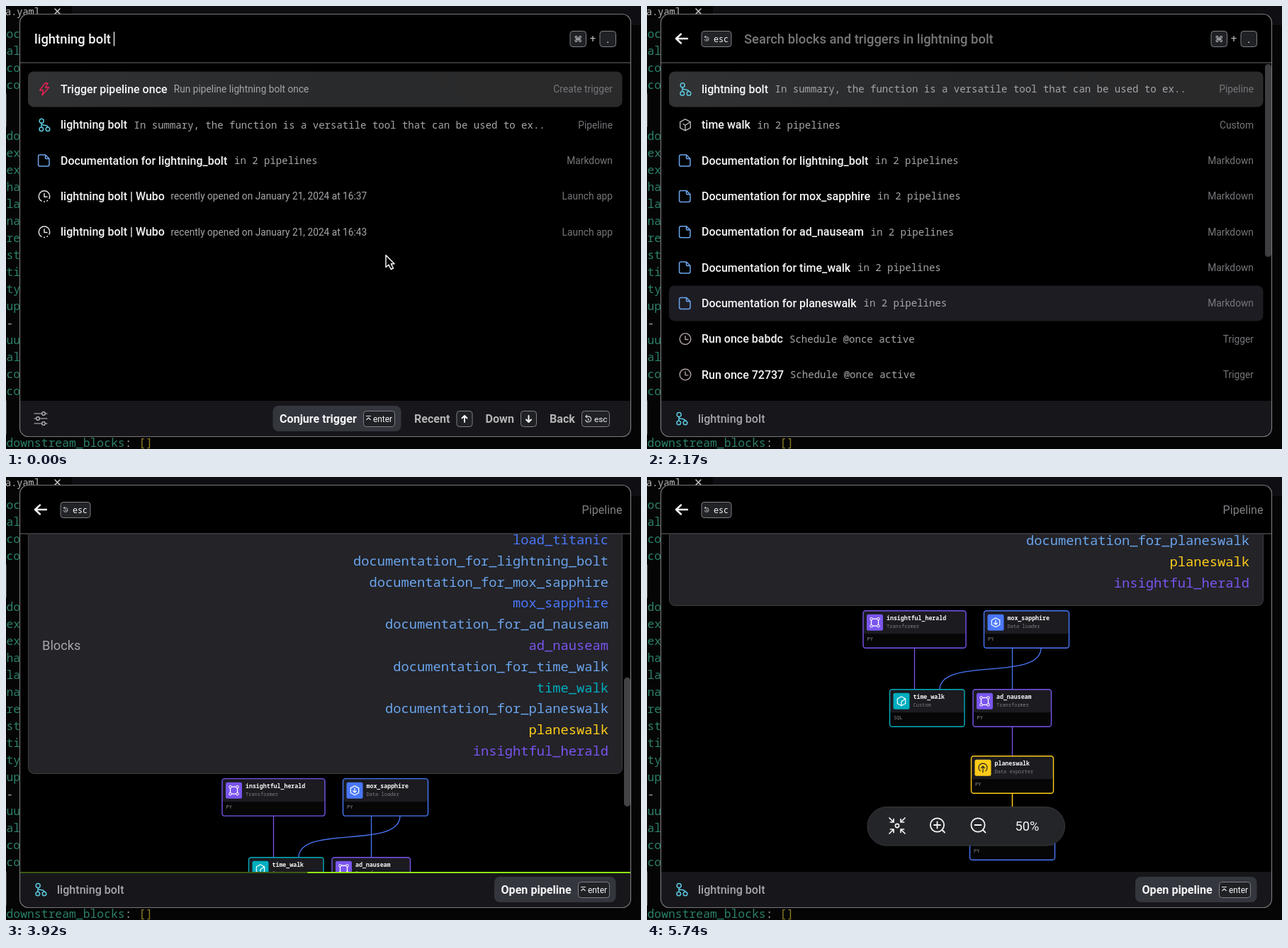
An HTML page for the animation above (6.09 s loop, 896 px wide and 625 px high).

```html
<!DOCTYPE html>
<html lang="en">
<head>
<meta charset="utf-8">
<title>Command palette</title>
<style>
html, body { margin: 0; width: 100%; height: 100%; overflow: hidden; background: #050506; }
svg { display: block; width: 100%; height: 100%; }
text { font-family: Roboto, sans-serif; white-space: pre; }
.mono { font-family: "Noto Sans Mono", "DejaVu Sans Mono", monospace; }
.med { font-weight: 500; }
.bold { font-weight: 700; }
.end { text-anchor: end; }
.mid { text-anchor: middle; }
</style>
</head>
<body>
<svg id="stage" viewBox="0 0 896 625"></svg>
<script>
const LOOP = 6090;
const GREY = '#a6a6aa', DIM = '#76767b', WHITE = '#f5f5f6';
const CYAN = '#5cc6de', BLUE = '#6ba4ec', VIOLET = '#7a55ee', ROYAL = '#4a77f8', TEAL = '#00aebf', GOLD = '#ffcc19';

// Text is placed by its vertical centre.
const text = (x, cy, str, size, fill, cls = '') =>
  `<text x="${x}" y="${cy + size * 0.355}" font-size="${size}" fill="${fill}" class="${cls}">${str}</text>`;
const rect = (x, y, w, h, r, fill, stroke = 'none', sw = 1) =>
  `<rect x="${x}" y="${y}" width="${w}" height="${h}" rx="${r}" fill="${fill}" stroke="${stroke}" stroke-width="${sw}"/>`;
const path = (d, stroke, sw = 1.5, fill = 'none') =>
  `<path d="${d}" fill="${fill}" stroke="${stroke}" stroke-width="${sw}" stroke-linecap="round" stroke-linejoin="round"/>`;
const circle = (x, y, r, stroke, sw = 1.5, extra = '') =>
  `<circle cx="${x}" cy="${y}" r="${r}" fill="none" stroke="${stroke}" stroke-width="${sw}" ${extra}/>`;
const at = (x, y, body, id = '') => `<g ${id && `id="${id}"`} transform="translate(${x} ${y})">${body}</g>`;
const group = (id, body) => `<g id="${id}">${body}</g>`;

const icons = {
  bolt: path('M1 -8.5 L-6.5 1.5 H-1.5 L-3 8.5 L6.5 -2.5 H1.5 L5 -8.5 Z', '#dc2452', 1.6),
  flow: circle(-3.8, -5.6, 3, CYAN) + circle(-4.2, 6, 2.8, CYAN) + circle(5, 6, 2.8, CYAN) +
    path('M-4 -2.5 V3 M-4 -1.5 C-3 2 4 -1 5 3', CYAN),
  doc: path('M-6.2 -8 H1.5 L7 -2.6 V5.8 Q7 8 4.8 8 H-6.2 Q-8.4 8 -8.4 5.8 V-5.8 Q-8.4 -8 -6.2 -8 Z M1.5 -7.8 V-4.4 Q1.5 -2.6 3.5 -2.6 H6.8', BLUE),
  recent: circle(0, 0, 7.7, '#e4e4e6', 1.5, 'stroke-dasharray="4 2.5 2 2.5 2 2.5 33"') +
    path('M0 -4 V0.8 H4', '#e4e4e6'),
  cube: path('M0 -8.2 L7.3 -4.2 V4.2 L0 8.2 L-7.3 4.2 V-4.2 Z M0 8 V0.5 L7 -4 M0 0.5 L-3 -1.3', '#b4b4b7', 1.4),
  clock: circle(0, 0, 7.8, '#b5a3a4', 1.4) + path('M0 -4 V0.8 H4', '#b5a3a4', 1.4),
  loop: path('M-3.6 1 A3.9 3.9 0 1 0 0 -3.9 H-3.6 M-1.8 -5.6 L-3.7 -3.9 L-1.8 -2.1 M0 -1 V1 H1.4', '#dcdcde', 1.1)
};
const icon = (name, x, y) => at(x, y, icons[name]);

const keycap = (x, y, w, body, fill = '#202125') => at(x, y, rect(0.5, 0.5, w - 1, 22, 4, fill, '#7f8084') + body);
const enterKey = x => keycap(x, 571, 45,
  path('M4.5 7.5 H10.5 M4.8 12.5 L7.5 10 L10.2 12.5', '#e5e5e7', 1.2) + text(14, 12, 'enter', 11.9, WHITE));
const arrowKey = (x, dir) => keycap(x, 571, 23,
  path(`M11.5 ${11.5 - 4.5 * dir} V${11.5 + 4 * dir} M8 ${11.5 + dir} L11.5 ${11.5 + 4.5 * dir} L15 ${11.5 + dir}`, WHITE, 2));
const action = (x, w, label) => rect(x, 564, w, 36, 8, '#34363e') +
  text(x + 9.5, 582, label, 16.1, WHITE, 'bold') + enterKey(x + w - 53.5);
const hint = (x, label) => text(x, 582, label, 16.1, '#b3b3b6', 'bold');

const rowY = i => 117.4 + 50.33 * i;
const rowBox = (i, fill, id = '') =>
  at(0, rowY(i) - 25, rect(31, 0, 838.5, 50, 8, fill), id);
const row = ([kind, title, subX, sub, mono, label], i) => {
  const y = rowY(i);
  return icon(kind, 54, y) + text(77, y, title, 16, WHITE, 'med') +
    text(subX, y, sub, mono ? 14.03 : 13.72, GREY, mono ? 'mono' : '') +
    text(856, y, label, 13.8, DIM, 'end');
};
const summary = ['flow', 'lightning bolt', 180.5, 'In summary, the function is a versatile tool that can be used to ex..', 1, 'Pipeline'];
const doc = (name, x) => ['doc', 'Documentation for ' + name, x, 'in 2 pipelines', 1, 'Markdown'];
const opened = time => ['recent', 'lightning bolt | Wubo', 232.5, 'recently opened on January 21, 2024 at ' + time, 0, 'Launch app'];
const run = (id, x) => ['clock', 'Run once ' + id, x, 'Schedule @once active', 1, 'Trigger'];

const startRows = [
  ['bolt', 'Trigger pipeline once', 236.8, 'Run pipeline lightning bolt once', 0, 'Create trigger'],
  summary, doc('lightning_bolt', 322), opened('16:37'), opened('16:43')
];
const blockRows = [
  summary, ['cube', 'time walk', 155.5, 'in 2 pipelines', 1, 'Custom'],
  doc('lightning_bolt', 322), doc('mox_sapphire', 325), doc('ad_nauseam', 315.5),
  doc('time_walk', 297), doc('planeswalk', 305.5), run('babdc', 201), run('72737', 202)
];

function editor() {
  const lines = 'oc,al,co,co,,,do,ex,ex,ha,la,na,re,st,ti,ty,up,-,uu,al,co,co'.split(',');
  return rect(0, 0, 896, 625, 0, '#050506') + rect(93, 0, 803, 27, 0, '#0f0f13') +
    text(-1, 8, 'a.yaml', 13.6, '#b9b9bb', 'mono') + path('M69 4 L76 11 M76 4 L69 11', '#c8c8ca', 1.5) +
    lines.map((s, i) => text(0.5, 39 + 24.02 * i, s, 16.4, s === '-' ? '#a0a0a0' : '#2b8068', 'mono')).join('') +
    path('M0.5 124 V170 M0.5 557 V604', '#4a4a4d', 1) +
    text(0.5, 616, 'downstream_blocks<tspan fill="#a0a0a0">: </tspan><tspan fill="#8c7d22">[]</tspan>', 16.4, '#2b8068', 'mono');
}

const shortcut = () =>
  keycap(795.5, 35, 23.5, `<text x="11.7" y="16" font-size="12" fill="#d8d8da" class="mid" style="font-family:'DejaVu Sans',sans-serif">⌘</text>`) +
  text(828, 46, '+', 15, '#b8b8ba', 'mid') + keycap(837.5, 35, 23.5, text(11.7, 11.5, '.', 15, WHITE, 'mid'));

const backNav = () => path('M57 46 H41.5 M48 39.5 L41 46 L48 52.5', WHITE, 2.4) +
  keycap(76.5, 35, 43, at(7.5, 11.5, `<g transform="scale(.75)">${icons.loop}</g>`) + text(17.5, 12, 'esc', 11.7, WHITE, 'mono'), '#222326');

const crumb = () => icon('flow', 49, 582) + text(72, 582, 'lightning bolt', 16.1, GREY, 'med');

function sliders() {
  const line = (y, x) => path(`M40 ${y} H${x - 2.5} M${x + 2.5} ${y} H58`, '#c2c2c5', 1.2) + circle(x, y, 2.3, '#c2c2c5', 1.2);
  return line(575, 53) + line(582, 45) + line(589, 53);
}

function startPage() {
  return text(40, 46, 'lightning bolt', 18.4, WHITE, 'med') +
    group('caret', path('M152.5 37 V56', WHITE, 1.3)) + shortcut() +
    rowBox(0, 'url(#glow)', 'pick') + startRows.map(row).join('') + sliders() +
    group('first', action(376.5, 181, 'Conjure trigger') + hint(576, 'Recent')) +
    group('second', action(396.5, 191.5, 'Enchant pipeline') + hint(606.5, 'Up')) +
    arrowKey(635.5, -1) + hint(676.5, 'Down') + arrowKey(726, 1) + hint(767, 'Back') +
    keycap(812, 571, 40, icon('loop', 9.5, 12) + text(18, 12, 'esc', 11.8, WHITE));
}

function blockPage() {
  return backNav() + text(137, 46, 'Search blocks and triggers in lightning bolt', 18.4, '#77777a', 'med') + shortcut() +
    rowBox(0, 'url(#glow)') + rowBox(6, '#1d1c23') + blockRows.map(row).join('') +
    rect(872, 82, 9, 272, 4.5, '#3e3e42') + crumb();
}

function details() {
  const label = (y, s) => text(51, y, s, 18.3, GREY);
  const value = (y, s, cls = '', fill = '#b2b2b5') => text(850, y, s, cls ? 18.75 : 18.3, fill, 'end ' + cls);
  const blocks = [
    ['load_titanic', ROYAL], ['documentation_for_lightning_bolt', BLUE], ['documentation_for_mox_sapphire', BLUE],
    ['mox_sapphire', ROYAL], ['documentation_for_ad_nauseam', BLUE], ['ad_nauseam', VIOLET],
    ['documentation_for_time_walk', BLUE], ['time_walk', TEAL], ['documentation_for_planeswalk', BLUE],
    ['planeswalk', GOLD], ['insightful_herald', VIOLET]
  ];
  const rules = [154.5, 267.5, 330.5, 393.5, 456.5, 519.5, 582.5];
  return rect(31.5, 90.5, 838, 853, 8, '#232328', '#3d3d42') +
    rules.map(y => path(`M33 ${y} H868`, '#34343a', 1)).join('') +
    label(123, 'Name') + value(123, 'lightning bolt', '', WHITE) +
    label(211, 'Description') + value(186, 'In summary, the function is a versatile tool that') +
    value(211.5, 'can be used to export data to a specified data') + value(237, 'source.') +
    label(299, 'Type') + value(299, 'Standard', 'mono') +
    label(362, 'Project') + value(362, 'powerups', 'mono') +
    label(425, 'Tags') + value(425, '-', 'mono', DIM) +
    label(488, 'Updated at') + value(488, '2024-01-21T13:54:42-08:00', 'mono') +
    label(551, 'Triggers') + value(551, '3', 'mono') + label(763, 'Blocks') +
    blocks.map(([s, c], i) => value(613.4 + 29.8 * i, s, 'mono', c)).join('');
}

const glyphs = {
  Transformer: path('M-5 -5 H5 V5 H-5 Z', '#fff', 1.3) +
    [[-5, -5], [5, -5], [5, 5], [-5, 5]].map(([x, y]) => rect(x - 1.6, y - 1.6, 3.2, 3.2, 0.6, VIOLET, '#fff', 1)).join(''),
  'Data loader': path('M0 -6.5 L5.7 -3.3 V3.3 L0 6.5 L-5.7 3.3 V-3.3 Z M0 -3 V3 M-2.3 0.8 L0 3 L2.3 0.8', '#fff', 1.2),
  Custom: path('M0 -6.5 L5.7 -3.3 V3.3 L0 6.5 L-5.7 3.3 V-3.3 Z M0 6 V0.5 L5 -3', '#fff', 1.2),
  'Data exporter': path('M-3.8 4.5 A6 6 0 1 1 3.8 4.5 M0 6.5 V-2 M-2.6 0.4 L0 -2.2 L2.6 0.4', '#222', 1.2)
};
const node = (x, y, w, name, kind, lang, color) => at(x, y,
  rect(0, 0, w, 52.5, 3.5, '#060607') + rect(0.5, 0.5, w - 1, 32, 3, '#1b1b20') +
  rect(0, 0, w, 52.5, 3.5, 'none', color, 1.4) + rect(5, 5, 23, 23, 2.5, color) + at(16.5, 16.5, glyphs[kind]) +
  text(33, 10.5, name, 8.25, WHITE, 'mono bold') + text(33, 21.7, kind, 7, '#7d7d82', 'mono') +
  text(5.5, 40, lang, 7, '#8a8a8e', 'mono'));

function graph() {
  const lens = (x, sign) => circle(x, 491, 9.6, WHITE, 1.8) + path(`M${x + 7} 498 L${x + 10.5} 501.5 ${sign}`, WHITE, 1.8);
  const corner = [[-1, -1], [1, -1], [1, 1], [-1, 1]].map(([a, b]) =>
    path(`M${a * 11} ${b * 11} L${a * 5.5} ${b * 5.5} M${a * 5} ${b * 9.5} V${b * 5} H${a * 9.5}`, WHITE, 1.7)).join('');
  return path('M377.5 241 V300 M515.5 352 V394', VIOLET, 1.3) +
    path('M515.5 241 V300 M556 241 C556 289 413 253 413 300', ROYAL, 1.3) + path('M515.5 446 V488', GOLD, 1.5) +
    node(305, 188.7, 145, 'insightful_herald', 'Transformer', 'PY', VIOLET) +
    node(475.5, 188.7, 120, 'mox_sapphire', 'Data loader', 'PY', ROYAL) +
    node(342.5, 299.8, 105.5, 'time_walk', 'Custom', 'SQL', TEAL) +
    node(460, 299.8, 110.5, 'ad_nauseam', 'Transformer', 'PY', VIOLET) +
    node(457.5, 393.7, 116, 'planeswalk', 'Data exporter', 'PY', GOLD) +
    node(455.5, 487.8, 120, 'load_titanic', 'Data loader', 'PY', ROYAL) +
    rect(311, 465.5, 278.5, 54.5, 27.2, '#242529', '#38383d') +
    at(353, 492, corner + circle(0, 0, 2.6, WHITE, 1.6)) +
    lens(409.5, 'M405 491 H414 M409.5 486.5 V495.5') + lens(467, 'M462.5 491 H471.5') +
    text(536.5, 492.5, '50%', 18.2, WHITE, 'mid');
}

function detailPage() {
  return backNav() + text(869.5, 46, 'Pipeline', 16.1, '#808084', 'end') +
    `<g clip-path="url(#body)">${group('scroll', details() + at(0, 762, graph()))}</g>` +
    at(872, 82, rect(0, 0, 9, 182, 4.5, '#434347'), 'thumb') +
    group('progress', rect(19.5, 557, 862, 2, 0, '#3c5a14') +
      `<g clip-path="url(#inside)">${group('runner', rect(19.5, 557, 862, 2, 0, '#8ee612'))}</g>`) +
    crumb() + action(689, 171.5, 'Open pipeline');
}

const stage = document.getElementById('stage');
stage.innerHTML = `<defs>
  <linearGradient id="glow"><stop offset="0" stop-color="#303234"/><stop offset=".5" stop-color="#292a2b"/><stop offset="1" stop-color="#2a2a2b"/></linearGradient>
  <clipPath id="body"><rect x="20" y="81" width="861" height="476"/></clipPath>
  <clipPath id="inside"><rect x="19.5" y="550" width="862" height="12"/></clipPath>
</defs>` + editor() + rect(19.5, 11.5, 862, 596, 12, '#000') +
  '<path d="M19.5 557 H881.5 V595.5 a12 12 0 0 1 -12 12 H31.5 a12 12 0 0 1 -12 -12 Z" fill="#17171b"/>' +
  path('M20 80 H881', '#6d6d70', 1.2) +
  group('start', startPage()) + group('blocks', blockPage()) + group('detail', detailPage()) +
  rect(19.5, 11.5, 862, 596, 12, 'none', '#77777a', 1.2) +
  group('downKey', rect(399, 490, 98.5, 82, 18, '#1d1e23') + path('M448 515 V547 M434.5 534 L448 547.5 L461.5 534', '#fff', 4.6)) +
  group('enterPress', rect(393, 490, 110.5, 82, 18, '#1f2025') +
    path('M450.5 514 H462 Q467.5 514 467.5 519.5 V528.5 Q467.5 534 462 534 H429 M440 522 L428.5 534 L440 546.5', '#fff', 4.6)) +
  group('mouse', path('M536 351.5 V368.5 L540 365 L543.2 371.5 L546.4 370 L543.4 363.8 H548 Z', '#fff', 1.4, '#000'));

const OPEN = 2608; // detail page appears
const $ = id => document.getElementById(id);
const clamp = v => Math.max(0, Math.min(1, v));
const show = (id, on) => $(id).style.display = on ? '' : 'none';
const fade = (id, value) => $(id).setAttribute('opacity', value);
const move = (id, x, y) => $(id).setAttribute('transform', `translate(${x} ${y})`);

// Scroll keys: time, offset, speed.
const flick = [[3290, 0, 1.2], [3710, 397, 0.7], [4410, 709, 0.27], [4690, 762, 0]];
function scrollAt(t) {
  if (t <= flick[0][0]) return 0;
  for (let i = 1; i < flick.length; i++) {
    const [t0, a, va] = flick[i - 1], [t1, b, vb] = flick[i];
    if (t > t1) continue;
    const d = t1 - t0, u = (t - t0) / d, w = 1 - u;
    return a * w * w * (1 + 2 * u) + b * u * u * (3 - 2 * u) + d * u * w * (va * w - vb * u);
  }
  return 762;
}
const press = (t, from, to) => t < from ? 0 : clamp((to - t) / 120);

function render(t) {
  const second = t >= 630;
  show('start', t < 1330);
  show('blocks', t >= 1330 && t < OPEN);
  show('detail', t >= OPEN);
  show('caret', Math.floor(t / 490) % 2 === 0);
  show('mouse', !second);
  show('first', !second);
  show('second', second);
  move('pick', 0, rowY(second ? 1 : 0) - 25);
  fade('downKey', press(t, 630, 1190));
  fade('enterPress', Math.max(press(t, 1330, 1820), press(t, OPEN, 3220)));

  const y = scrollAt(t);
  move('scroll', 0, -y);
  move('thumb', 872, 82 + y * 0.3825);
  fade('thumb', clamp((5500 - t) / 250));
  show('progress', t < 4060);
  const phase = Math.max(0, t - OPEN) / 480 % 1;
  move('runner', 862 * (2 * phase - 1), 0);
}

function tick() {
  render(performance.now() % LOOP);
  requestAnimationFrame(tick);
}
tick();
</script>
</body>
</html>
```
